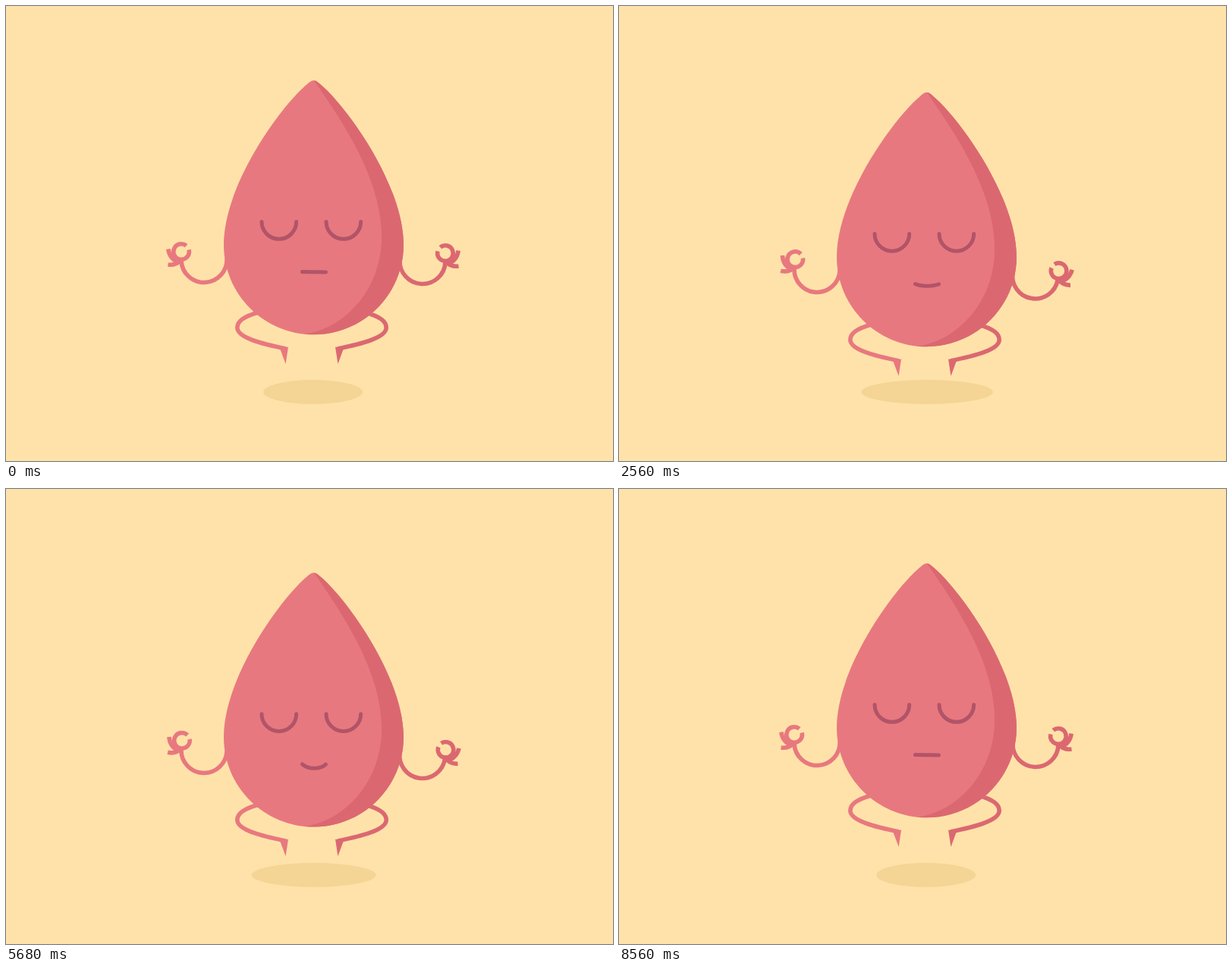
Animation of 800x600 px, one loop 8600 ms. Source, as an HTML page:

```html
<!DOCTYPE html>
<html lang="en">
<head>
<meta charset="utf-8">
<title>Meditating drop</title>
<style>
  html, body { margin: 0; width: 100%; height: 100%; overflow: hidden; background: #ffe2a9; }
  svg { display: block; width: 100%; height: 100%; }
  .line { fill: none; stroke: currentColor; stroke-width: 5.6; }
  .face { fill: none; stroke: #b15468; stroke-width: 5; stroke-linecap: round; }
  .light { color: #e8787f; }
  .dark { color: #db6871; }
</style>
</head>
<body>
<svg viewBox="0 0 800 600">
  <defs>
    <g id="arm" class="line">
      <path d="M291 333A30 30 0 0 1 231 336"/>
      <path d="M241 321.4A10.3 10.3 0 1 1 237.7 316.2"/>
      <path d="M213.8 320.5C215 329 219 335 228 338M213.5 341C220 342 226 340 231 335"/>
    </g>
    <g id="leg">
      <path class="line" d="M333 404C314 409 304.8 416 304.8 424C304.8 438 340 446 369 452"/>
      <path fill="currentColor" d="M361 451.5L372 449.5L368.6 472Z"/>
    </g>
    <path id="drop" d="M405.5 98.2C408 98.2 410 99.3 414 103C447 130 524 235 524 315C524 380 471 433.3 405.5 433.3C340 433.3 287 380 287 315C287 235 364 130 397 103C401 99.3 403 98.2 405.5 98.2Z"/>
    <clipPath id="inside"><use href="#drop"/></clipPath>
  </defs>

  <ellipse id="shadow" cy="509" ry="16" fill="#f4d596"/>
  <g id="figure">
    <g id="leftArm" class="light"><use href="#arm"/></g>
    <g id="rightArm" class="dark"><use href="#arm" transform="translate(810 2) scale(-1 1)"/></g>
    <use href="#leg" class="light"/>
    <use href="#leg" class="dark" transform="translate(806 0) scale(-1 1)"/>
    <use href="#drop" fill="#e8787f"/>
    <path clip-path="url(#inside)" fill="#db6871" d="M405 97C440 148 495 225 495 305C495 370 450 425 392 433L530 440V90Z"/>
    <path class="face" d="M337 284.5a22.8 22.8 0 0 0 45.6 0M422 284.5a22.8 22.8 0 0 0 45.6 0"/>
    <path id="mouth" class="face"/>
  </g>
</svg>
<script>
  const LOOP = 8600, BREATH = LOOP / 2, DROP = 17.2;
  const $ = id => document.getElementById(id);

  // Smooth 0..1 ramp between two times
  const ease = (t, start, end) => {
    const u = Math.min(1, Math.max(0, (t - start) / (end - start)));
    return u * u * (3 - 2 * u);
  };

  function draw(now) {
    const t = now % LOOP, b = t % BREATH;
    const sink = ease(b, 40, 2120) - ease(b, 2220, 4260);
    const dy = DROP * sink;
    const smile = ease(t, 2130, 3030) - ease(t, 6480, 7380);
    const bend = 7 * smile;

    $('figure').setAttribute('transform', `translate(0 ${dy})`);
    $('leftArm').setAttribute('transform', `rotate(${6.1 * sink} 291 333)`);
    $('rightArm').setAttribute('transform', `rotate(${7.4 * sink} 519 335)`);
    $('mouth').setAttribute('d',
      `M390.5 350.6C398 ${350.8 + bend} 414 ${350.8 + bend} 421.5 350.9`);
    $('shadow').setAttribute('cx', 404.6 + 0.09 * dy);
    $('shadow').setAttribute('rx', 65.5 + 1.34 * dy);
    requestAnimationFrame(draw);
  }

  draw(0);
</script>
</body>
</html>
```
